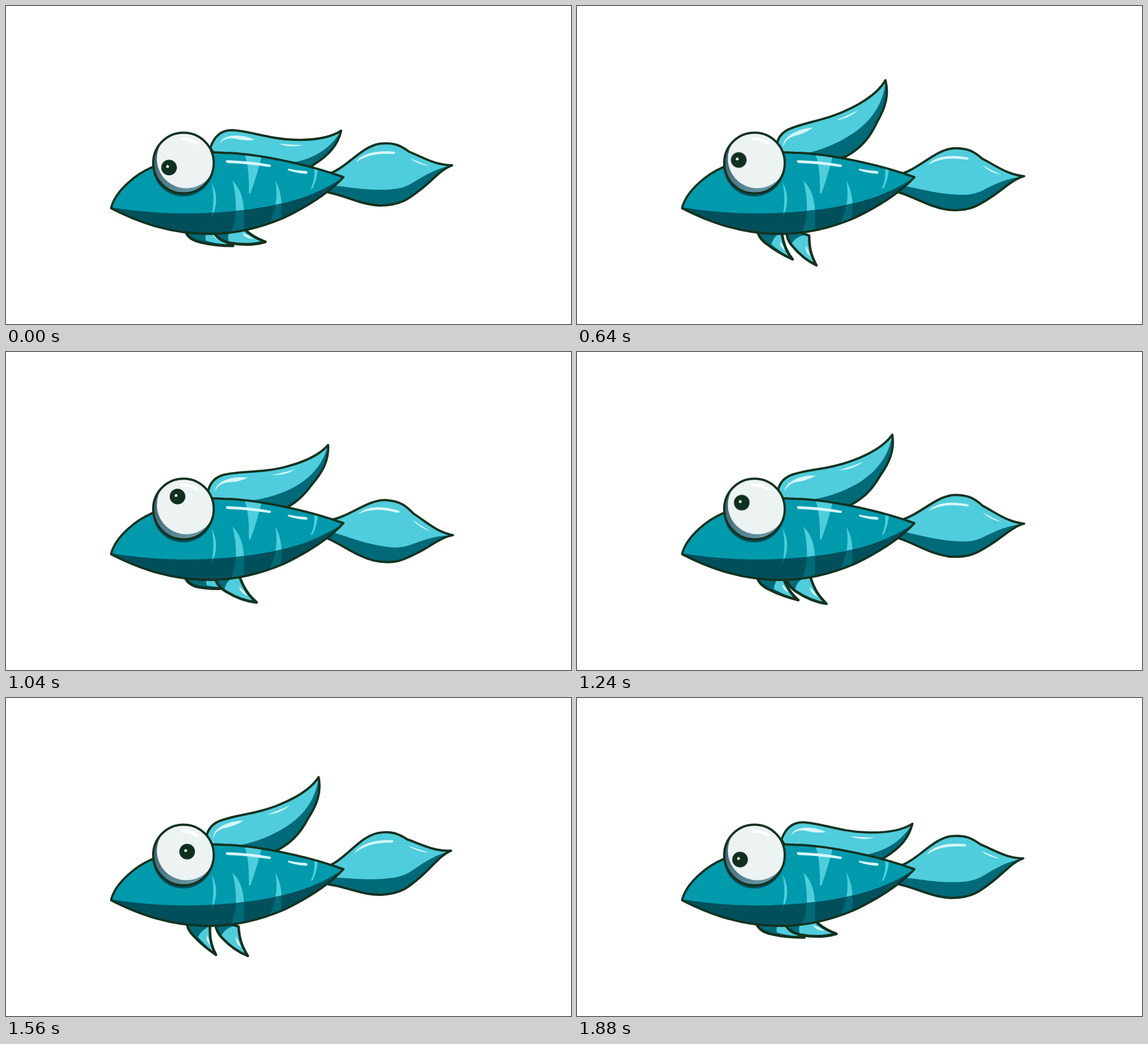
Animation, 998 px wide and 561 px high, one loop 1920 ms. Source, as an HTML page:

```html
<!DOCTYPE html>
<html lang="en">
<head>
<meta charset="utf-8">
<title>Fish</title>
<style>
@property --a { syntax: "<number>"; inherits: false; initial-value: 0; }
html, body { margin: 0; width: 100%; height: 100%; overflow: hidden; background: #fff; }
svg { display: block; width: 100%; height: 100%; }

.line { fill: none; stroke: #14321f; stroke-width: 4; stroke-linejoin: round; stroke-linecap: round; }
.pelvic .line { stroke-width: 5; }
.light { fill: #4fcddc; }
.dark { fill: #006a78; }
.shine { fill: #d5f6fa; }

/* Paused: the script steps these at 25 frames per second. */
.move { animation: 1920ms linear infinite paused; }
#dorsal { animation-name: dorsal; transform-origin: 384px 273px; transform: rotate(calc(var(--a) * -1deg)); }
#tail { animation-name: tail; transform-origin: 572px 310px; transform: rotate(calc(var(--a) * 1deg)); }
.pelvic { transform: rotate(calc(var(--a) * 1deg)) scale(calc(1 - var(--a) * .0026)); }
#near { animation-name: near; transform-origin: 378px 400px; }
#far { animation-name: far; transform-origin: 330px 398px; }
#pupil { animation-name: look; }

@keyframes dorsal {
  0%, 100% { --a: 0 }
  18.75% { --a: 10.6 }
  26.04% { --a: 13.6 }
  29.167% { --a: 13.5 }
  35.417% { --a: 34 }
  43.75% { --a: 5.9 }
  54.167% { --a: 16.2 }
  72.917% { --a: 26.7 }
  75% { --a: 27.2 }
  81.25% { --a: 24.1 }
  87.5% { --a: 5 }
  97.917% { --a: -.5 }
}
@keyframes tail {
  0%, 100% { --a: 0 }
  3.125% { --a: -.6 }
  18.75% { --a: 9.5 }
  23% { --a: 10.5 }
  43.75% { --a: -.4 }
  54.167% { --a: 11.1 }
  57% { --a: 11.4 }
  72.917% { --a: -.4 }
  79.167% { --a: -3.3 }
  81.25% { --a: -3.1 }
  91.667% { --a: 1.8 }
  97.917% { --a: .5 }
}
@keyframes near {
  0%, 100% { --a: 0 }
  18.75% { --a: 7.4 }
  29.167% { --a: 18 }
  35.417% { --a: 52 }
  43.75% { --a: -3.7 }
  54.167% { --a: 21.6 }
  72.917% { --a: 25.7 }
  81.25% { --a: 36.9 }
  85.417% { --a: 47 }
  87.5% { --a: 46 }
  97.917% { --a: 0 }
}
@keyframes far {
  0%, 100% { --a: 0 }
  18.75% { --a: 14.3 }
  29.167% { --a: 20 }
  43.75% { --a: 35.7 }
  54.167% { --a: -5.7 }
  72.917% { --a: 29.1 }
  81.25% { --a: 33.9 }
  87.5% { --a: 20 }
  97.917% { --a: -.7 }
}
@keyframes look {
  0%, 14.583%, 87.5%, 100% { transform: translate(288px, 285px) }
  18.75% { transform: translate(292px, 277px) }
  27.083%, 29.167% { transform: translate(303px, 255px) }
  35.417% { transform: translate(277px, 280px) }
  43.75% { transform: translate(330px, 290px) }
  54.167%, 58.333% { transform: translate(303px, 255px) }
  72.917% { transform: translate(275px, 280px) }
  81.25% { transform: translate(320px, 271px) }
}
</style>
</head>
<body>
<svg viewBox="0 0 998 561" preserveAspectRatio="none">
  <defs>
    <path id="bodyShape" d="M186 355C194 325 232 294 262 283C300 262 340 256 385 259C440 260 530 278 596 302C572 328 534 353 490 374C450 391 405 402 360 402C290 402 235 382 186 357Z"/>
    <path id="bellyShape" d="M186 355C270 370 380 370 470 352C522 342 562 325 596 302L596 420L186 420Z"/>
    <path id="dorsalShape" d="M361 250C367 232 379 219 399 219C430 220 465 235 510 236C545 237 572 233 592 220C586 246 570 263 545 279C522 297 500 307 468 308L385 290Z"/>
    <path id="tailShape" d="M550 304C570 298 580 293 590 286C612 272 634 247 660 243C685 240 697 246 712 257C737 267 758 281 788 281C768 288 752 309 732 324C712 340 697 352 660 352C625 350 600 335 570 329L550 320Z"/>
    <path id="nearShape" d="M366 397Q374 414 396 418Q430 424 458 416C440 409 427 402 409 381Z"/>
    <path id="farShape" d="M316 394Q320 412 345 417Q370 423 401 423C387 416 374 406 360 383Z"/>
    <circle id="eyeShape" cx="313.5" cy="277" r="53.5"/>
    <g id="stripes">
      <path d="M363 311Q380 342 362 375Q370 342 363 311Z"/>
      <path d="M400 308C417 326 423 345 420 398L398 398C410 372 407 335 400 308Z"/>
      <path d="M476 308C486 328 489 345 485 380L464 386C478 358 480 335 476 308Z"/>
      <path d="M419 258Q430 276 429 331L432 330Q443 300 453 260Z"/>
      <path d="M544 284Q547 305 538 323L542 321Q550 305 551 286Z"/>
    </g>
    <linearGradient id="eyeShade" x1="0" y1="0" x2="1" y2="1">
      <stop offset=".2" stop-color="#3d6573"/>
      <stop offset=".8" stop-color="#6494a1"/>
    </linearGradient>
    <clipPath id="inBody"><use href="#bodyShape"/></clipPath>
    <clipPath id="inBelly"><use href="#bellyShape"/></clipPath>
    <clipPath id="inDorsal"><use href="#dorsalShape"/></clipPath>
    <clipPath id="inTail"><use href="#tailShape"/></clipPath>
    <clipPath id="inNear"><use href="#nearShape"/></clipPath>
    <clipPath id="inFar"><use href="#farShape"/></clipPath>
    <clipPath id="inEye"><use href="#eyeShape"/></clipPath>
  </defs>

  <g id="tail" class="move">
    <use href="#tailShape" class="light"/>
    <path class="dark" clip-path="url(#inTail)" d="M788 281C756 288 738 300 718 312C702 322 686 324 665 324C630 325 600 318 550 314L550 370L788 370Z"/>
    <path class="shine" d="M617 276C630 259 655 254 686 257Q690 260 684 261C655 260 640 262 617 276Z"/>
    <path class="shine" d="M713 268Q730 276 748 282Q727 280 713 268Z"/>
    <use href="#tailShape" class="line"/>
  </g>

  <g id="dorsal" class="move">
    <use href="#dorsalShape" class="light"/>
    <path class="dark" clip-path="url(#inDorsal)" d="M592 220C577 245 552 268 507 276C470 282 430 279 385 264L385 330L600 330Z"/>
    <path class="shine" d="M378 242C383 227 412 224 440 236Q423 239 404 234Q388 231 378 242Z"/>
    <path class="shine" d="M481 243Q505 245 525 245Q505 251 481 243Z"/>
    <use href="#dorsalShape" class="line"/>
  </g>

  <g id="far" class="move pelvic">
    <use href="#farShape" class="light"/>
    <path class="dark" clip-path="url(#inFar)" d="M310 380L362 380Q350 400 353 414Q375 420 401 423L310 430Z"/>
    <path class="shine" d="M366 402Q367 411 381 414Q374 406 366 402Z"/>
    <use href="#farShape" class="line"/>
  </g>

  <g id="near" class="move pelvic">
    <use href="#nearShape" class="light"/>
    <path class="dark" clip-path="url(#inNear)" d="M360 380L408 380Q386 398 395 422L360 422Z"/>
    <path class="shine" d="M417 400Q422 411 438 411Q428 404 417 400Z"/>
    <use href="#nearShape" class="line"/>
  </g>

  <g clip-path="url(#inBody)">
    <use href="#bodyShape" fill="#009aad"/>
    <use href="#stripes" fill="#4fcddc"/>
    <use href="#bellyShape" fill="#00505c"/>
    <g clip-path="url(#inBelly)"><use href="#stripes" fill="#006a77"/></g>
    <circle cx="313" cy="282" r="54" fill="#00505c"/>
  </g>
  <path fill="#d5f6fa" d="M390 272Q430 273 467 280Q470 283 465 284Q425 278 391 277Q386 274 390 272Z"/>
  <path fill="#d5f6fa" d="M499 287Q513 290 530 291Q535 293 531 296Q513 295 499 290Q496 288 499 287Z"/>
  <use href="#bodyShape" class="line"/>

  <g clip-path="url(#inEye)">
    <use href="#eyeShape" fill="url(#eyeShade)"/>
    <circle cx="318.5" cy="269.5" r="52" fill="#edf2f3"/>
    <path fill="#fff" d="M310 232Q331 231 341 243Q339 247 333 243Q324 237 313 238Q305 235 310 232Z"/>
  </g>
  <use href="#eyeShape" class="line"/>
  <g id="pupil" class="move">
    <circle r="13.8" fill="#10301f"/>
    <path fill="#fff" d="M-2.5 -5L0 -2Q0 1 -3 .5Q-6 0 -5 -2.5Z"/>
  </g>
</svg>
<script>
const LOOP = 1920, STEP = 40;
const moves = document.getAnimations();
const start = performance.now();

function draw() {
  const t = (performance.now() - start) % LOOP;
  const held = Math.floor(t / STEP) * STEP;
  for (const m of moves) m.currentTime = held;
  requestAnimationFrame(draw);
}
draw();
</script>
</body>
</html>
```
